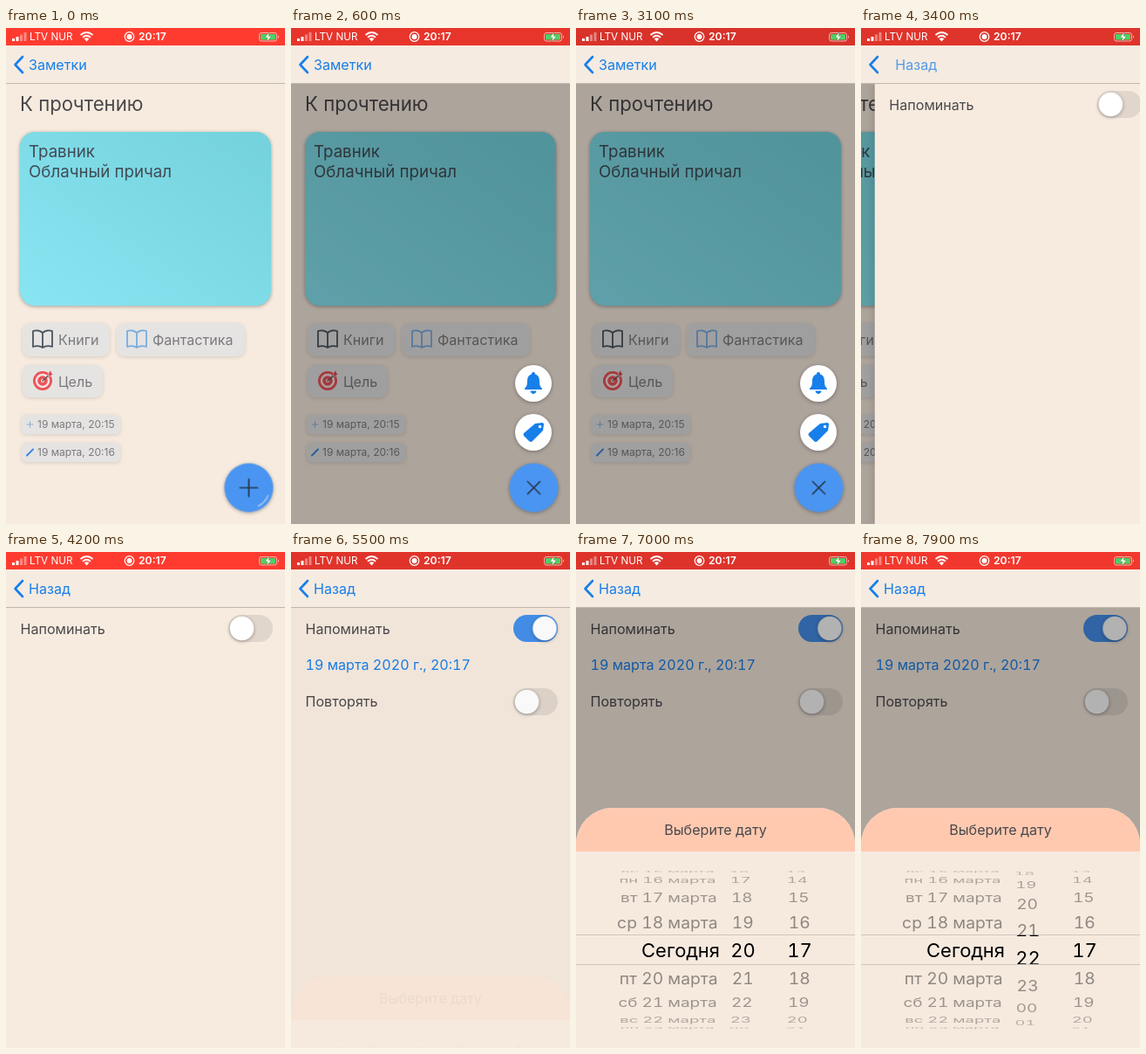
Recreate the animation shown at these times as an HTML page. Size 320 by 568 pixels, loop 8 s.

```html
<!DOCTYPE html>
<html lang="ru">
<head>
<meta charset="utf-8">
<title>Напоминание к заметке</title>
<style>
html, body { margin: 0; width: 100%; height: 100%; overflow: hidden; background: #f7ebdf; }
svg { display: block; width: 320px; height: 568px; font-family: Inter, Roboto, sans-serif; font-size: 16.1px; }
.ink { fill: #49484b; }
.blue { fill: #177fea; }
.chip { fill: #e5e4e3; filter: drop-shadow(0 1px 2px #0002); }
.chipText { fill: #7c7a7d; }
.small { font-size: 12px; }
.num { font-variant-numeric: tabular-nums; }
.lift { filter: drop-shadow(0 1px 2px #0005); }
.line { fill: none; stroke-linecap: round; stroke-linejoin: round; }

.a { animation: 8s linear infinite both; }
.dim { animation-name: dim; }
.cross { animation-name: cross; }
.glint { animation-name: glint; }
.tagBtn { animation-name: tagBtn; }
.bellBtn { animation-name: bellBtn; }
.note { animation-name: note; }
.detail { animation-name: detail; }
.back1 { animation-name: back1; }
.back2 { animation-name: back2; }
.knob { animation-name: knob; }
.track { animation-name: track; }
.rows { animation-name: rows; }
.shade { animation-name: shade; }
.sheet { animation-name: sheet; }
.tint { animation-name: tint; }
.content { animation-name: content; }

@keyframes dim { 0%, 1.25% { opacity: 0; animation-timing-function: ease-out } 5.5%, 100% { opacity: 1 } }
@keyframes cross { 0%, 1.25% { transform: rotate(0); animation-timing-function: ease-out } 5.5%, 100% { transform: rotate(45deg) } }
@keyframes glint { 0% { opacity: .75 } 3%, 100% { opacity: 0 } }
@keyframes tagBtn {
  0%, 1.5% { transform: scale(0); opacity: 0; animation-timing-function: ease-out }
  5.5%, 100% { transform: scale(1); opacity: 1 }
}
@keyframes bellBtn {
  0%, 2.5% { transform: scale(0); opacity: 0; animation-timing-function: ease-out }
  6.5%, 100% { transform: scale(1); opacity: 1 }
}
@keyframes note {
  0%, 39.2% { transform: none; animation-timing-function: cubic-bezier(.2, .7, .2, 1) }
  45%, 100% { transform: translateX(-96px) }
}
@keyframes detail {
  0%, 39.2% { transform: translateX(340px); animation-timing-function: cubic-bezier(.2, .7, .2, 1) }
  45%, 100% { transform: none }
}
@keyframes back1 { 0%, 39.2% { opacity: 1; transform: none } 42.5%, 100% { opacity: 0; transform: translateX(-24px) } }
@keyframes back2 { 0%, 39.5% { opacity: 0; transform: translateX(50px); animation-timing-function: ease-out } 45%, 100% { opacity: 1; transform: none } }
@keyframes knob { 0%, 57.5% { transform: none; animation-timing-function: ease-in-out } 60.5%, 100% { transform: translateX(20.5px) } }
@keyframes track { 0%, 57.5% { fill: #e1d6cc } 60.5%, 100% { fill: #448feb } }
@keyframes rows { 0%, 58.75% { opacity: 0 } 61.5%, 100% { opacity: 1 } }
@keyframes shade { 0%, 67.8% { opacity: 0; animation-timing-function: ease-in-out } 72.75%, 100% { opacity: 1 } }
@keyframes sheet {
  0%, 67.8% { transform: translateY(276px); animation-timing-function: ease-out }
  72.75%, 100% { transform: none }
}
@keyframes tint { 0%, 67.8% { opacity: 0 } 72.75%, 100% { opacity: 1 } }
@keyframes content { 0%, 67.8% { opacity: 0; animation-timing-function: ease-in } 72.75%, 100% { opacity: 1 } }
</style>
</head>
<body>
<svg viewBox="0 0 320 568">
  <defs>
    <linearGradient id="sea" x1="0" y1="1" x2="1" y2="0">
      <stop offset="0" stop-color="#88e5f2"/><stop offset="1" stop-color="#74d2dc"/>
    </linearGradient>
    <path id="book" class="line" stroke-width="1.8" d="M0-8V9M0-8C-3-11-8-11-11-10V8C-8 7-3 7 0 9C3 7 8 7 11 8V-10C8-11 3-11 0-8"/>
    <clipPath id="above"><rect y="363" width="320" height="76"/></clipPath>
    <clipPath id="middle"><rect y="439" width="320" height="33"/></clipPath>
    <clipPath id="below"><rect y="473" width="320" height="75"/></clipPath>
  </defs>
  <rect width="320" height="568" fill="#f7ebdf"/>

  <g class="a note">
    <text class="ink" x="16" y="95" font-size="22.2">К прочтению</text>
    <rect x="16" y="119" width="288" height="199" rx="17" fill="url(#sea)" style="filter:drop-shadow(0 1px 2px #0005)"/>
    <g fill="#424a54" font-size="18.7">
      <text x="26" y="148">Травник</text>
      <text x="26" y="171">Облачный причал</text>
    </g>
    <rect class="chip" x="19" y="338" width="100" height="38" rx="9"/>
    <rect class="chip" x="127" y="338" width="147" height="38" rx="9"/>
    <rect class="chip" x="19" y="386" width="92" height="37" rx="9"/>
    <use href="#book" x="42" y="357" stroke="#4b535d"/>
    <use href="#book" x="150" y="357" stroke="#78addf"/>
    <g transform="translate(42 404)" fill="none">
      <circle r="11" fill="#ec5358"/>
      <circle r="7" stroke="#f4e4e2" stroke-width="2.4"/>
      <circle r="2" fill="#f4e4e2"/>
      <path class="line" d="M0 0L8-7" stroke="#57545d" stroke-width="1.5"/>
      <path d="M6-6L7-10L10-12V-9L12-8L9-5Z" fill="#dc4a50" stroke="#e5e4e3" stroke-width=".7"/>
    </g>
    <g class="chipText">
      <text x="60" y="363">Книги</text>
      <text x="168" y="363">Фантастика</text>
      <text x="60" y="411">Цель</text>
    </g>
    <rect class="chip" x="18" y="443" width="113" height="22" rx="5"/>
    <rect class="chip" x="18" y="475" width="113" height="22" rx="5"/>
    <path class="line" d="M24 454h7M27.500 450.500v7" stroke="#8bb0da"/>
    <path class="line" d="M24 489.500L31 482.500" stroke="#3e88dc" stroke-width="2"/>
    <g class="chipText small">
      <text x="36" y="458">19 марта, 20:15</text>
      <text x="36" y="490">19 марта, 20:16</text>
    </g>
    <rect class="a dim" y="64" width="420" height="504" fill="#000" fill-opacity=".3"/>

    <g transform="translate(278 407)"><g class="a bellBtn">
      <circle class="lift" r="21" fill="#fff"/>
      <path class="blue" d="M0-13C1.500-13 2-12 2-10.500C6-9.500 7-6 7-2C7 3 8.500 4 10 6V7H-10V6C-8.500 4-7 3-7-2C-7-6-6-9.500-2-10.500C-2-12-1.500-13 0-13ZM-3.500 8.500H3.500C3 13-3 13-3.500 8.500Z"/>
    </g></g>
    <g transform="translate(278 463)"><g class="a tagBtn">
      <circle class="lift" r="21" fill="#fff"/>
      <path class="blue" d="M2-10L10-11Q12-11 12-9L11-2L-1 10Q-3 12-5 10L-11 4Q-12 2-11 1Z"/>
      <circle cx="7.500" cy="-6.500" r="1.700" fill="#fff"/>
    </g></g>
    <g transform="translate(278.500 526.500)">
      <circle class="lift" r="28" fill="#4a95f1"/>
      <path class="line a glint" d="M22 9A24 24 0 0 1 11 21" stroke="#cfe3fb" stroke-width="1.500"/>
      <path class="line a cross" d="M-10 0H10M0-10V10" stroke="#23364d" stroke-width="1.700"/>
    </g>
  </g>

  <g class="a detail">
    <rect y="64" width="320" height="504" fill="#f7ebdf" style="filter:drop-shadow(-2px 0 4px #0002)"/>
    <text class="ink" x="16.500" y="94">Напоминать</text>
    <rect class="a track" x="255" y="72" width="51" height="31" rx="15.500"/>
    <circle class="a knob lift" cx="270.500" cy="87.500" r="13.800" fill="#fff"/>
    <g class="a rows">
      <text class="blue num" x="16.500" y="135">19 марта 2020 г., 20:17</text>
      <text class="ink" x="16.500" y="177">Повторять</text>
      <rect x="255" y="156" width="51" height="31" rx="15.500" fill="#e1d6cc"/>
      <circle class="lift" cx="270.500" cy="171.500" r="13.800" fill="#fff"/>
    </g>
    <rect class="a shade" y="64" width="320" height="504" fill="#000" fill-opacity=".3"/>
    <g class="a sheet">
      <path d="M0 568V335A42 42 0 0 1 42 293H278A42 42 0 0 1 320 335V568Z" fill="#f6eadf"/>
      <path class="a tint" d="M0 343V335A42 42 0 0 1 42 293H278A42 42 0 0 1 320 335V343Z" fill="#ffc9b0"/>
      <g class="a content">
        <text class="ink" x="160" y="324" text-anchor="middle">Выберите дату</text>
        <path d="M0 438.500H320M0 472.500H320" stroke="#d0c6bd"/>
        <g id="wheels" class="num"></g>
      </g>
    </g>
  </g>

  <rect y="20" width="320" height="44" fill="#f5ebe1"/>
  <path d="M0 63.500H320" stroke="#c0b7ae"/>
  <path class="line" d="M19 33L10.500 42L19 51" stroke="#177fea" stroke-width="2.600"/>
  <text class="blue a back1" x="26" y="48">Заметки</text>
  <text class="blue a back2" x="26" y="48">Назад</text>

  <rect id="bar" width="320" height="20" fill="#ff3b30"/>
  <g fill="#fff">
    <path d="M7 12h3v3h-3zM11.500 10h3v5h-3z"/>
    <path d="M16 7.500h3v7.500h-3zM20.500 5h3v10h-3z" opacity=".4"/>
    <text x="27" y="14.200" font-size="11.7">LTV NUR</text>
    <path d="M92.500 15.500L89.700 12.300Q92.500 10 95.300 12.300Z"/>
    <path class="line" stroke="#fff" stroke-width="1.900" style="stroke-linecap:butt" d="M88 10.700Q92.500 7 97 10.700M85.500 8Q92.500 2 99.500 8"/>
    <circle cx="141.500" cy="10" r="5.300" fill="none" stroke="#fff" stroke-width="1.200"/>
    <circle cx="141.500" cy="10" r="3"/>
    <text x="152" y="14.300" font-size="12.2" font-weight="600">20:17</text>
    <rect x="290.500" y="5.500" width="20" height="9.500" rx="2.500" fill="none" stroke="#fff" stroke-opacity=".6"/>
    <rect x="292" y="7" width="17" height="6.500" rx="1.200" fill="#4cd264"/>
    <path d="M312 8.500Q314 10.200 312 12Z" opacity=".7"/>
    <path d="M302 4.500L297 11H300L299 16L304.500 9.300H301.300Z" stroke="#4a7d3e" stroke-width=".5"/>
  </g>
</svg>
<script>
const LOOP = 8000, STEP = .364, RADIUS = 90, MID = 456;
const days = ['вс', 'пн', 'вт', 'ср', 'чт', 'пт', 'сб'];
const pad = n => String(n).padStart(2, '0');
const columns = [
  { x: 165, anchor: 'end', now: 19, label: n => n === 19 ? 'Сегодня' : `${days[(n - 15) % 7]} ${n} марта` },
  { x: 191.5, anchor: 'middle', now: 20, label: n => pad(n % 24) },
  { x: 256.5, anchor: 'middle', now: 17, label: pad },
];
const svgNode = (tag, attrs, parent) => {
  const node = document.createElementNS('http://www.w3.org/2000/svg', tag);
  for (const key in attrs) node.setAttribute(key, attrs[key]);
  return parent.appendChild(node);
};

// Each band shows the same drum; only the middle one is large and dark.
const rows = [];
for (const band of ['above', 'middle', 'below']) {
  const dark = band === 'middle', size = dark ? 22 : 19.4;
  const group = svgNode('g', { 'clip-path': `url(#${band})`, 'font-size': size }, wheels);
  columns.forEach((col, c) => {
    for (let k = -5; k <= 8; k++) {
      const node = svgNode('text', { 'text-anchor': col.anchor, y: size * .364 }, group);
      node.textContent = col.label(col.now + k);
      rows.push({ node, k, c, dark });
    }
  });
}

function turn(row, pos) {
  const angle = (row.k - pos) * STEP, depth = Math.cos(angle);
  const hidden = Math.abs(angle) > 1.53;
  row.node.setAttribute('visibility', hidden ? 'hidden' : 'inherit');
  if (hidden) return;
  const back = 1 - depth, edge = row.dark || row.c ? 0 : 2;
  const x = columns[row.c].x - edge - 5 * back, y = MID + RADIUS * Math.sin(angle);
  row.node.setAttribute('transform', `translate(${x} ${y}) scale(${1 - .08 * back} ${depth})`);
  row.node.setAttribute('opacity', row.dark ? 1 : .16 + .28 * depth);
}

let start;
function draw(now) {
  start ??= now;
  const t = (now - start) % LOOP;
  const glow = .5 + .5 * Math.cos(2 * Math.PI * t / 2075);
  bar.setAttribute('fill', `rgb(${216 + 39 * glow},${50 + 9 * glow},${42 + 6 * glow})`);
  const hours = 1.72 * (Math.max(0, t - 7400) / 500) ** 1.3;
  for (const row of rows) turn(row, row.c === 1 ? hours : 0);
  requestAnimationFrame(draw);
}
requestAnimationFrame(draw);
</script>
</body>
</html>
```
